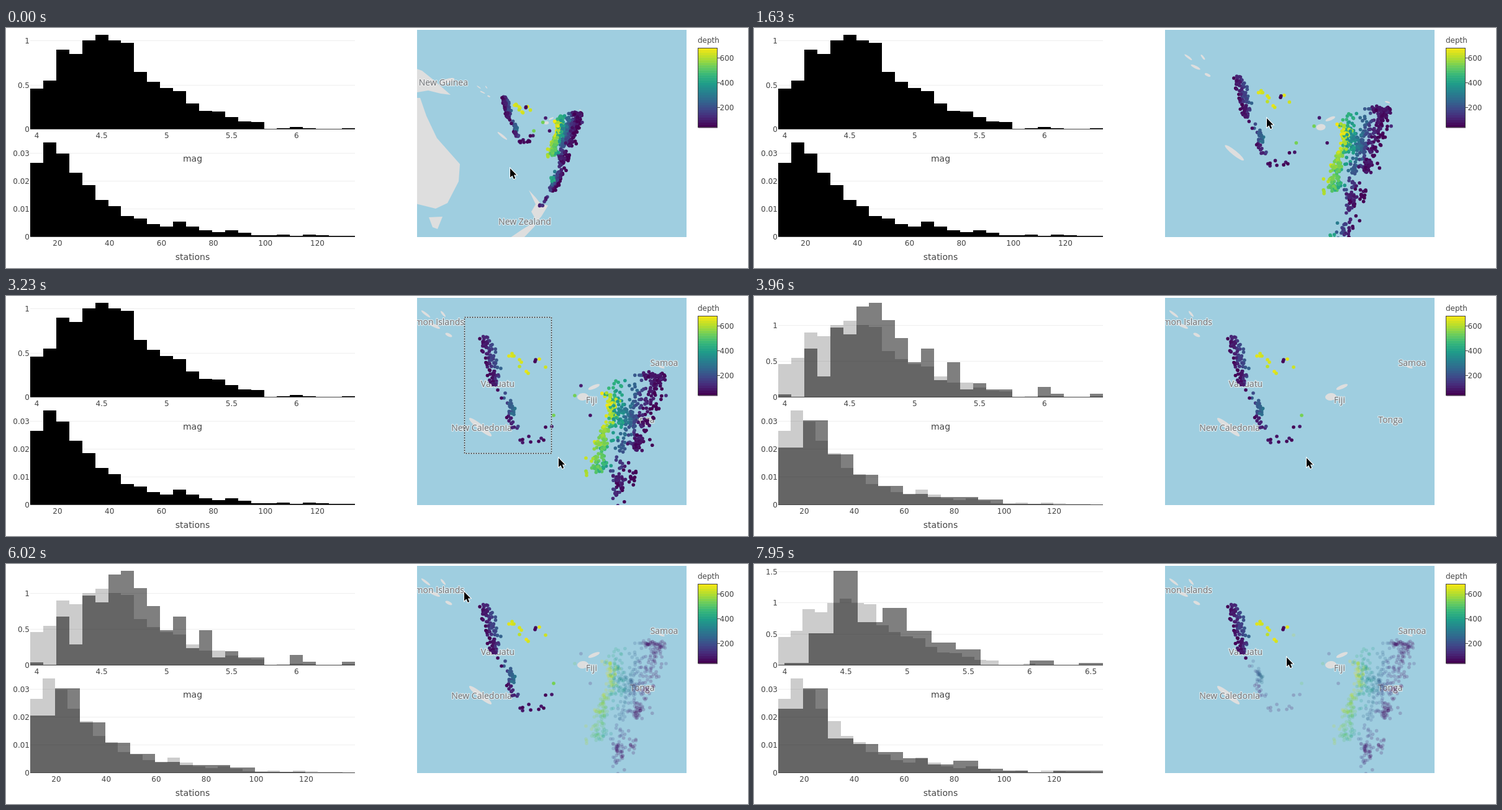
An HTML page with a canvas for the animation above (8 s loop, 1195 by 388 pixels).

```html
<!DOCTYPE html>
<html lang="en">
<head>
<meta charset="utf-8">
<title>Linked earthquake views</title>
<style>
html, body { margin: 0; width: 100%; height: 100%; overflow: hidden; background: #fff; }
canvas { display: block; width: 1195px; height: 388px; }
</style>
</head>
<body>
<canvas id="stage"></canvas>
<script>
const W = 1195, H = 388, LOOP = 8000;
const canvas = document.getElementById('stage');
const ctx = canvas.getContext('2d');
const dpr = window.devicePixelRatio || 1;
canvas.width = W * dpr;
canvas.height = H * dpr;

const PLOT_FONT = '"DejaVu Sans", Verdana, sans-serif';
const MAP_FONT = '"Open Sans", "Noto Sans", sans-serif';
const MAP = { x: 662, y: 3, w: 434, h: 335 };
const FOCUS = { x: 826, y: 146 };
const WIDE = 0.43;          // map scale before zooming in

// ---------- helpers ----------
const clamp = (v, a, b) => Math.min(b, Math.max(a, v));
const mix = (a, b, u) => a + (b - a) * u;
const easeOut = u => 1 - (1 - clamp(u, 0, 1)) ** 2;
const smooth = u => u * u * (3 - 2 * u);
const mapX = (x, s) => FOCUS.x + (x - FOCUS.x) * s;
const mapY = (y, s) => FOCUS.y + (y - FOCUS.y) * s;

// index of the current step in a stepped move, -1 before it starts
function step(t, from, to, n) {
  if (t < from) return -1;
  return Math.min(n - 1, Math.floor((t - from + 8) * (n - 1) / (to - from || 1)));
}

let seed = 20;
function rand() {
  seed = (seed + 0x6D2B79F5) | 0;
  let r = Math.imul(seed ^ (seed >>> 15), 1 | seed);
  r = (r + Math.imul(r ^ (r >>> 7), 61 | r)) ^ r;
  return ((r ^ (r >>> 14)) >>> 0) / 4294967296;
}
const gauss = () => (rand() + rand() + rand() - 1.5) * 1.8;

const VIRIDIS = ['#440154', '#482878', '#3e4989', '#31688e', '#26828e',
  '#1f9e89', '#35b779', '#6ece58', '#b5de2b', '#f4e614']
  .map(c => [1, 3, 5].map(i => parseInt(c.slice(i, i + 2), 16)));
function viridis(u) {
  const p = clamp(u, 0, 1) * (VIRIDIS.length - 1);
  const i = Math.min(VIRIDIS.length - 2, Math.floor(p));
  return 'rgb(' + VIRIDIS[i].map((c, k) => Math.round(mix(c, VIRIDIS[i + 1][k], p - i))) + ')';
}

// ---------- quakes ----------
const quakes = [];
function quake(x, y, depth) {
  quakes.push({ x, y, color: viridis((depth - 40) / 640), key: rand() });
}
// points scattered along a path; slope makes depth follow the sideways offset
function band(n, path, spread, d0, d1, slope = 0) {
  const last = path.length / 2 - 1;
  for (let i = 0; i < n; i++) {
    const u = rand(), p = u * last, k = 2 * Math.floor(p), f = p % 1;
    const dx = gauss() * spread;
    quake(mix(path[k], path[k + 2], f) + dx, mix(path[k + 1], path[k + 3], f) + gauss() * 3,
      mix(d0, d1, u) + dx * slope + gauss() * 25);
  }
}
function spots(depth, xy) {
  for (let i = 0; i < xy.length; i += 2) quake(xy[i], xy[i + 1], depth + gauss() * 20);
}

// western arc
band(68, [772, 68, 778, 92, 784, 118], 5.2, 100, 150, 9);
band(30, [784, 122, 787, 142], 4, 70, 110, 6);
band(28, [814, 174, 814, 189], 3.5, 220, 250, 8);
band(12, [806, 196, 828, 217], 3, 70, 130);
spots(60, [792, 152, 798, 165, 842, 227, 832, 232, 828, 233, 845, 236, 832, 237,
  858, 235, 862, 230, 866, 233, 869, 212, 879, 211, 853, 103, 852, 106]);
spots(220, [804, 157, 802, 165]);
spots(650, [810, 97, 815, 93, 815, 97, 818, 97, 827, 103, 830, 107, 827, 114,
  838, 122, 841, 125, 859, 102, 869, 115]);
spots(550, [882, 193, 916, 161]);

// eastern arc, deep to shallow
band(62, [968, 160, 980, 172, 976, 195, 962, 220], 5, 630, 590, -4);
band(72, [962, 222, 955, 245, 956, 265, 950, 282], 5.5, 570, 510, -4);
band(52, [987, 132, 982, 160, 990, 190, 975, 215, 968, 285], 8, 430, 400, -3);
band(40, [985, 165, 992, 205], 8, 390, 330, -4);
band(100, [1020, 132, 1013, 175, 1008, 205, 990, 255], 8, 210, 220, -6);
band(50, [1030, 129, 1060, 132], 5, 70, 60, -2);
band(95, [1048, 135, 1035, 180, 1018, 245], 9, 75, 60, -3);
band(24, [1014, 228, 1018, 248], 4, 70, 60);
band(24, [985, 292, 990, 308], 5, 90, 70);
band(36, [992, 262, 986, 300, 990, 328], 8, 130, 80, -4);
band(14, [1011, 278, 1006, 302], 3, 50, 50);
band(66, [985, 330, 975, 370, 965, 395, 945, 420], 10, 130, 100, -8);
band(8, [950, 360, 958, 385], 5, 420, 400);
band(9, [933, 434, 920, 460, 900, 479], 3, 140, 100);
spots(80, [926, 145, 941, 193, 1063, 161]);
spots(610, [934, 283, 935, 286, 935, 290, 934, 262, 943, 267]);
quakes.sort((a, b) => a.key - b.key);

const inside = (q, x, y, x2, y2) => q.x >= x && q.x <= x2 && q.y >= y && q.y <= y2;
for (const q of quakes) {
  q.first = inside(q, 738, 34, 890, 262);
  q.second = inside(q, 738, 45, 860, 153);
}

// ---------- land ----------
// coasts in wide-view coordinates
const AUSTRALIA = [656, 113, 667, 113, 677, 142, 684, 157, 694, 178, 716, 203, 731, 220,
  729, 248, 711, 283, 692, 292, 676, 288, 656, 283];
const NEW_GUINEA = [656, 64, 670, 69, 691, 86, 716, 108, 700, 106, 680, 101, 656, 105];
const TASMANIA = [681, 306, 703, 305, 695, 325, 687, 322];
const NORTH_ISLAND = [842, 262, 853, 274, 861, 284, 873, 287, 862, 305, 855, 313,
  846, 297, 853, 285];
const SOUTH_ISLAND = [849, 315, 831, 326, 812, 339, 834, 339, 852, 320];
const COASTS = [AUSTRALIA, NEW_GUINEA, TASMANIA, NORTH_ISLAND, SOUTH_ISLAND];

// islands in close-view coordinates: x, y, rx, ry, angle
const ISLANDS = [
  [764, 212, 23, 4.5, 0.68], [676, 29, 9, 2, 0.65], [690, 48, 10, 2.5, 0.45],
  [704, 29, 6, 1.8, 0.9], [713, 63, 6, 2.5, 0.45], [556, 6, 30, 8, -0.3],
  [929, 163, 9, 6, -0.1], [947, 147, 10, 3, -0.4], [1056, 115, 5, 1.6, 0.3]
];

function drawLand(s) {
  ctx.fillStyle = '#dedede';
  for (const c of COASTS) {
    ctx.beginPath();
    for (let i = 0; i < c.length; i += 2) ctx.lineTo(mapX(c[i], s / WIDE), mapY(c[i + 1], s / WIDE));
    ctx.fill();
  }
  for (const [x, y, rx, ry, a] of ISLANDS) {
    ctx.beginPath();
    ctx.ellipse(mapX(x, s), mapY(y, s), rx * s, ry * s, a, 0, 7);
    ctx.fill();
  }
}

function place(text, x, y, align = 'center') {
  ctx.font = '14px ' + MAP_FONT;
  ctx.textAlign = align;
  ctx.lineJoin = 'round';
  ctx.lineWidth = 2.5;
  ctx.strokeStyle = 'rgba(240,240,240,0.75)';
  ctx.strokeText(text, x, y);
  ctx.fillStyle = '#6c6f73';
  ctx.fillText(text, x, y);
}

function drawPlaces(k, s) {
  if (k < 2) {
    if (k < 0) place('Papua New Guinea', 744, 92.5, 'right');
    else place('New Guinea', 742, 91.5, 'right');
    place('New Zealand', 835.5, mapY(318, s / WIDE));
  } else if (k === 7) {
    place('Solomon Islands', 738, 47, 'right');
    place('Vanuatu', 792, 147);
    place('New Caledonia', 766, 218);
    place('Fiji', 943, 173);
    place('Samoa', 1060, 113);
    place('Tonga', 1025, 205);
  }
}

// ---------- map ----------
function drawQuakes(s, selection, others) {
  for (const pass of [false, true]) {
    for (const q of quakes) {
      const on = !selection || q[selection];
      if (on !== pass || (!on && !others)) continue;
      ctx.globalAlpha = on ? 1 : others;
      ctx.fillStyle = q.color;
      ctx.beginPath();
      ctx.arc(mapX(q.x, s), mapY(q.y, s), 2.8, 0, 7);
      ctx.fill();
    }
  }
  ctx.globalAlpha = 1;
}

function drawBox(k, x, y, x2, y2) {
  const w = Math.round((x2 - x) * easeOut((k - 0.4) / 4.97));
  const h = Math.round((y2 - y) * easeOut((k + 0.07) / 5));
  if (k < 0 || w < 2) return;
  ctx.lineWidth = 1.5;
  ctx.strokeStyle = 'rgba(255,255,255,0.75)';
  ctx.strokeRect(x + 0.5, y + 0.5, w, h);
  ctx.setLineDash([2, 2]);
  ctx.strokeStyle = '#222';
  ctx.strokeRect(x + 0.5, y + 0.5, w, h);
  ctx.setLineDash([]);
}

function drawMap(t) {
  const k = step(t, 1040, 2070, 8);
  const zoom = k < 0 ? 0 : 1 - (1 - ((k + 0.25) / 7.25) ** 1.5) ** 2.7;
  const s = WIDE ** (1 - zoom);
  const selection = t >= 7210 ? 'second' : t >= 3515 ? 'first' : null;
  const hidden = (t >= 3515 && t < 4250) || (t >= 7210 && t < 7800);
  ctx.save();
  ctx.beginPath();
  ctx.rect(MAP.x, MAP.y, MAP.w, MAP.h);
  ctx.clip();
  ctx.fillStyle = '#9fcee0';
  ctx.fillRect(MAP.x, MAP.y, MAP.w, MAP.h);
  drawLand(s);
  drawPlaces(k, s);
  drawQuakes(s, selection, hidden ? 0 : 0.2);
  if (t < 3960) drawBox(step(t, 2660, 3520, 7), 738, 34, 890, 262);
  else if (t < 7510) drawBox(step(t, 6320, 7210, 7), 738, 45, 858, 151);
  ctx.restore();
}

// ---------- charts ----------
function label(text, x, y, align = 'center', size = 12) {
  ctx.font = size + 'px ' + PLOT_FONT;
  ctx.textAlign = align;
  ctx.fillStyle = '#444';
  ctx.fillText(text, x, y);
}

function bars(heights, x0, width, base, scale, alpha) {
  ctx.fillStyle = `rgba(0,0,0,${alpha})`;
  heights.forEach((h, i) => {
    const a = Math.round(x0 + i * width), b = Math.min(562, Math.round(x0 + (i + 1) * width));
    const top = Math.round(base - h * scale);
    ctx.fillRect(a, top, b - a, base - top);
  });
}

function axes(base, xs, ys) {
  for (const [text, y] of ys) {
    ctx.fillStyle = '#eee';
    if (y < base - 1) ctx.fillRect(39, Math.round(y - 0.5), 523, 1);
    label(text, 38, y + 4.5, 'right');
  }
  for (const [text, x] of xs) label(text, x, base + 14);
}

const ticks = (names, start, gap) => names.map((n, i) => [n, start + i * gap]);

const MAG = [66, 79, 129, 122, 144, 153, 144, 140, 93, 77, 67, 62, 42, 30, 29, 20, 13, 12, 0, 2, 4, 2, 1, 1, 2];
const MAG_FIRST = [5, 0, 79, 34, 113, 102, 147, 153, 125, 96, 57, 79, 28, 57, 13, 23, 13, 13, 0, 0, 17, 6, 0, 0, 6];
const MAG_SECOND = [4, 52, 153, 70, 93, 56, 37, 26, 0, 0, 8, 0, 4];
const STATIONS = [120, 153, 135, 104, 84, 60, 50, 34, 30, 21, 17, 25, 17, 11, 8, 11, 7, 3, 3, 4, 2, 4, 3, 2, 2];
const STATIONS_FIRST = [93, 137, 82, 49, 31, 18, 13, 13, 9, 2, 2, 1, 1];
const STATIONS_SECOND = [104, 137, 56, 47, 34, 24, 14, 20, 7, 4, 0, 4, 4];

function drawCharts(t) {
  const view = t >= 7510 ? 2 : t >= 3960 ? 1 : 0;
  const back = view ? 0.2 : 1;

  const unit = [143, 116, 100.7][view];
  const magWidth = view === 2 ? 19.73 : 20.92;
  const magTicks = ['4', '4.5', '5', '5.5', '6'];
  const levels = ['0', '0.5', '1'];
  if (view === 2) {
    magTicks.push('6.5');
    levels.push('1.5');
  }
  axes(164, ticks(magTicks, 49.5, view === 2 ? 98.6 : 104.6), ticks(levels, 163.5, -unit / 2));
  bars(MAG, 39, magWidth, 164, unit / 143, back);
  if (view === 1) bars(MAG_FIRST, 39, magWidth, 164, 1, 0.5);
  if (view === 2) bars(MAG_SECOND, 49, magWidth * 2, 164, 1, 0.5);

  const stWidth = view ? 20.12 : 20.92;
  axes(337.5, ticks(['20', '40', '60', '80', '100', '120'], view ? 81 : 83, view ? 80.5 : 83.7),
    ticks(['0', '0.01', '0.02', '0.03'], 337.5, -45));
  bars(STATIONS, 39, stWidth, 338, 1, back);
  if (view) bars(view === 1 ? STATIONS_FIRST : STATIONS_SECOND, 39, stWidth * 2, 338, 1, 0.5);

  ctx.fillStyle = '#444';
  ctx.fillRect(39, 163, 523, 1);
  ctx.fillRect(39, 337, 523, 1);
  label('mag', 300.5, 216, 'center', 14);
  label('stations', 300.5, 375, 'center', 14);
}

function drawScale() {
  const n = 32, top = 32, h = 129;
  for (let i = 0; i < n; i++) {
    ctx.fillStyle = viridis(1 - i / (n - 1));
    ctx.fillRect(1115, top + i * h / n, 31, h / n + 0.5);
  }
  ctx.lineWidth = 1;
  ctx.strokeStyle = '#444';
  ctx.strokeRect(1114.5, top + 0.5, 31, h - 1);
  label('depth', 1114, 24, 'left');
  for (const [text, y] of ticks(['600', '400', '200'], 48, 40.2)) {
    ctx.fillRect(1146, Math.round(y), 4, 1);
    label(text, 1149.5, y + 4.5, 'left');
  }
}

// ---------- pointer ----------
// from, to, steps, x, y
const MOVES = [
  [300, 740, 4, 826, 146], [2070, 2070, 1, 917, 69], [2220, 2360, 2, 738, 34],
  [2660, 3230, 5, 890, 262], [5000, 6020, 8, 738, 45], [6320, 6913, 5, 858, 151]
];
const ARROW = new Path2D('M0 0V14.5L3.4 11.5 5.8 17 8.2 16 5.9 10.6 10.2 10.4Z');

function drawPointer(t) {
  let x = 812, y = 227;
  for (const [from, to, n, tx, ty] of MOVES) {
    const k = step(t, from, to, n);
    if (k < 0) break;
    const u = n === 5 ? easeOut((k + 1) / n) : smooth((k + 1) / n);
    x = mix(x, tx, u);
    y = mix(y, ty, u);
  }
  ctx.save();
  ctx.translate(x, y);
  ctx.lineJoin = 'miter';
  ctx.lineWidth = 2;
  ctx.strokeStyle = '#fff';
  ctx.stroke(ARROW);
  ctx.fillStyle = '#000';
  ctx.fill(ARROW);
  ctx.restore();
}

let start = null;
function draw(now) {
  if (start === null) start = now;
  const t = (now - start) % LOOP;
  ctx.setTransform(dpr, 0, 0, dpr, 0, 0);
  ctx.fillStyle = '#fff';
  ctx.fillRect(0, 0, W, H);
  drawCharts(t);
  drawMap(t);
  drawScale();
  drawPointer(t);
  requestAnimationFrame(draw);
}
requestAnimationFrame(draw);
</script>
</body>
</html>
```
